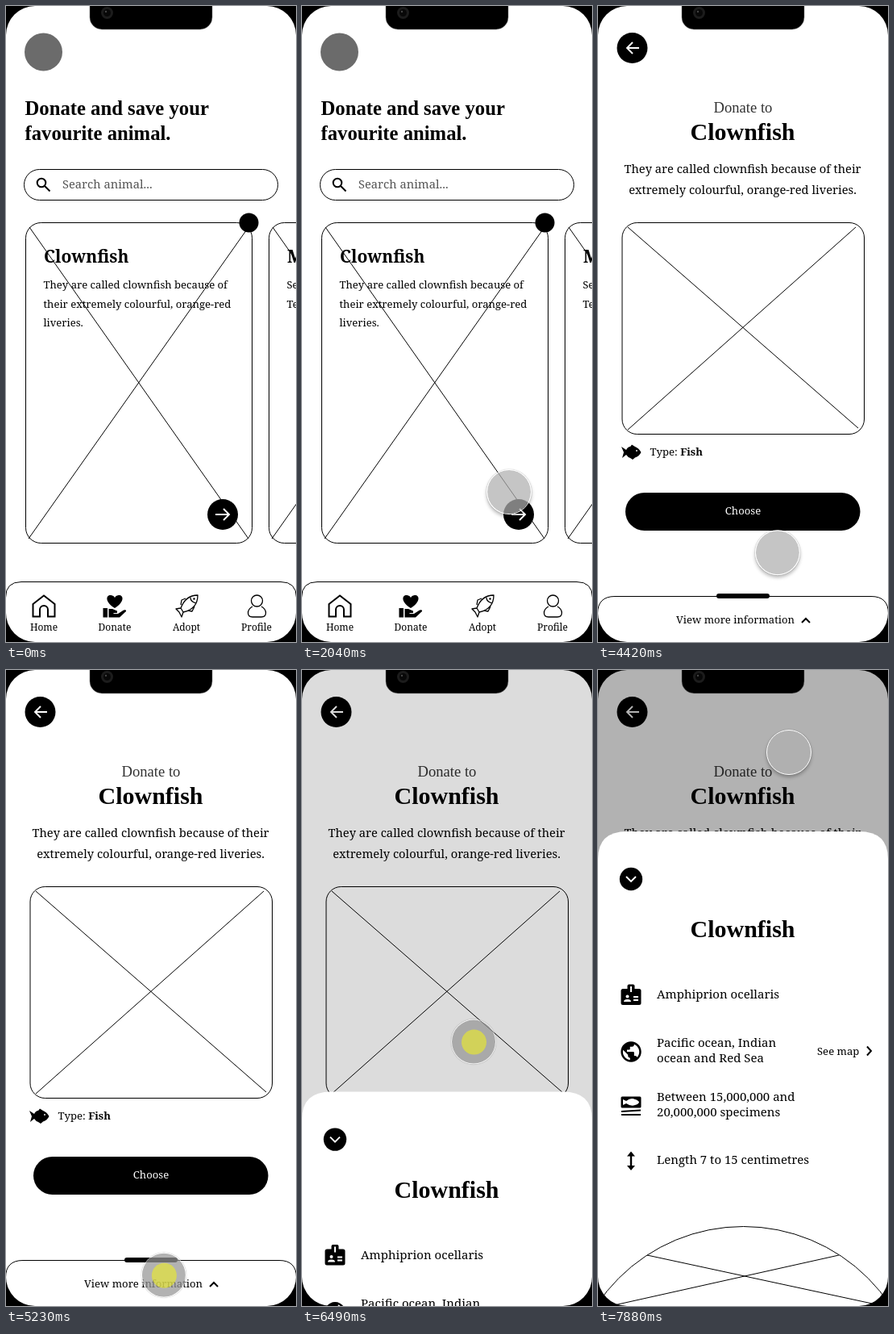
An HTML page for the animation above (8 s loop, 360 px wide and 788 px high).

```html
<!DOCTYPE html>
<html lang="en">
<head>
<meta charset="utf-8">
<style>
html, body { margin: 0; width: 100%; height: 100%; overflow: hidden; background: #fff; }
svg { position: absolute; left: 0; top: 0; width: 360px; height: 788px; }
text { font-family: "Noto Serif", serif; font-size: 13.1px; }
.line { fill: none; stroke: #000; }
.panel { fill: #fff; stroke: #000; }
.white { fill: none; stroke: #fff; stroke-width: 1.9; }
.bold { font-weight: bold; }
.mid { text-anchor: middle; }
.display { font-family: "Liberation Serif", serif; }
.heading { font-size: 24.7px; }
.name { font-size: 30px; }
.card-name { font-size: 21px; }
.lead { font-size: 14.7px; }
.nav text { font-size: 12px; }
.facts text { font-size: 15px; }
#cursor {
  position: absolute; left: -28px; top: -28px; width: 56px; height: 56px;
  box-sizing: border-box; border-radius: 50%; border: 1.5px solid #fff;
  background: rgba(175,175,175,.725) padding-box;
  box-shadow: 0 0 1px rgba(0,0,0,.5), 0 3px 4px rgba(0,0,0,.28);
}
#cursor.pressed {
  background-color: rgba(149,149,149,.725); border-color: rgba(255,255,255,.6);
  box-shadow: 0 0 1px rgba(0,0,0,.5);
}
#cursor.pressed::after {
  content: ""; position: absolute; inset: 11.5px; border-radius: 50%;
  background: rgba(236,236,40,.62);
}
</style>
</head>
<body>
<svg viewBox="0 0 360 788">
  <defs>
    <g id="card">
      <rect class="line" x="24.5" y="268.5" width="281" height="397" rx="19"/>
      <path class="line" d="M29 274L301 660M301 274L28 660"/>
      <circle cx="301.5" cy="268.5" r="12"/>
    </g>
  </defs>

  <g id="home">
    <circle cx="46.5" cy="57" r="23.5" fill="#6b6b6b"/>
    <text class="display heading bold" x="23.5" y="135">Donate and save your</text>
    <text class="display heading bold" x="23.5" y="166">favourite animal.</text>
    <rect class="line" x="22.5" y="202.5" width="315" height="38" rx="19"/>
    <g class="line" stroke-width="2"><circle cx="44" cy="219" r="5.3"/><path d="M48 223L54.5 229.5"/></g>
    <text class="lead" x="70" y="225.5" fill="#555">Search animal...</text>

    <use href="#card"/>
    <text class="bold card-name" x="47" y="318">Clownfish</text>
    <text x="46.5" y="350">They are called clownfish because of</text>
    <text x="46.5" y="374">their extremely colourful, orange-red</text>
    <text x="46.5" y="397">liveries.</text>
    <circle cx="269" cy="630" r="19"/>
    <path class="white" d="M260 630H277M270 623L277 630L270 637"/>

    <use href="#card" x="302"/>
    <text class="bold card-name" x="349" y="318">Manatee</text>
    <text x="348.5" y="350">Sea</text>
    <text x="348.5" y="374">Ten</text>

    <path class="panel" d="M-.5 790V733Q-.5 713.5 19 713.5H341Q360.5 713.5 360.5 733V790"/>
    <g class="nav mid">
      <path class="line" stroke-width="2" d="M33.5 741L47 730.5L60.5 741V756.5H52V748a5 5 0 0 0-10 0V756.5H33.5Z"/>
      <text x="47" y="774">Home</text>

      <path d="M135 746C121 737 125 729 130.5 730Q134 730.5 135 733Q136 730.5 139.5 730C145 729 149 737 135 746ZM120.5 746H126V757.5H120.5ZM127.5 747H132L138 749.5V752H133.5V753H139L146 748.5Q150 747.5 149 750L141 757.5H127.5Z"/>
      <text x="135" y="774">Donate</text>

      <g class="line" stroke-width="1.3" stroke-linejoin="round">
        <path d="M238 730Q223 730 217 746L211 747L215 751L218 757L220 751Q238 747 238 730ZM217 746L220 751M229 733Q229 738 236 740M223 734L218 736L217 742M234 744L231 750L226 749"/>
        <circle cx="233.5" cy="734.5" r=".6"/>
      </g>
      <text x="224" y="774">Adopt</text>

      <g class="line" stroke-width="1.3">
        <circle cx="311.5" cy="737" r="7"/>
        <path d="M306 744Q300.5 747 300.5 752Q300.5 757 306 757H317Q322.5 757 322.5 752Q322.5 747 317 744"/>
      </g>
      <text x="311" y="774">Profile</text>
    </g>
  </g>

  <g id="detail">
    <rect width="360" height="788" fill="#fff"/>
    <text class="mid display" x="180" y="132" fill="#333" style="font-size:18.6px">Donate to</text>
    <text class="mid display bold name" x="179.5" y="166">Clownfish</text>
    <text class="mid lead" x="179.5" y="206.5">They are called clownfish because of their</text>
    <text class="mid lead" x="179.5" y="232.5">extremely colourful, orange-red liveries.</text>
    <rect class="line" x="30" y="268.5" width="300.5" height="262" rx="18.5"/>
    <path class="line" d="M37 274L323 523M320 274L37 525"/>
    <path d="M29 546L35 550Q37 546 40 546L42 543.5L46 546Q51 548 53.5 553Q51 558 46 559.5L43 562L40 560Q37 559 35 556L30 560L32 553Z"/>
    <circle cx="48" cy="551" r=".9" fill="#fff"/>
    <text x="64.5" y="557">Type: <tspan class="bold">Fish</tspan></text>
    <rect x="34" y="603" width="291.5" height="47" rx="23.5"/>
    <text class="mid" x="180" y="630" fill="#fff">Choose</text>
    <path class="panel" d="M-.5 790V753Q-.5 731.5 21 731.5H339Q360.5 731.5 360.5 753V790"/>
    <rect x="147" y="728" width="66" height="6" rx="3"/>
    <text x="97" y="764.5">View more information</text>
    <path class="line" stroke-width="2" d="M253 764L258 759L263 764"/>
    <rect id="shade" width="360" height="788" opacity="0"/>
    <circle cx="42.5" cy="52" r="19"/>
    <path class="white" id="back" d="M51 52H36M43 45L36 52L43 59"/>
  </g>

  <g id="sheet">
    <path fill="#fff" d="M0 600V34Q0 0 36 0H324Q360 0 360 34V600Z"/>
    <circle cx="41" cy="59" r="14.2"/>
    <path class="white" d="M35 56L41 62L47 56"/>
    <text class="mid display bold name" x="179.5" y="131">Clownfish</text>

    <rect x="28.5" y="195" width="25" height="20" rx="2.5"/>
    <rect x="36.5" y="189.5" width="9" height="11" rx="2"/>
    <path stroke="#fff" stroke-width="2" d="M41 192V199M44 205H50M44 209H50"/>
    <g fill="#fff"><circle cx="36.5" cy="204.5" r="2"/><path d="M32 211Q32 208 36.5 208T41 211Z"/></g>

    <path transform="translate(25.8 257.8) scale(1.27)" d="M12 2C6.48 2 2 6.48 2 12s4.48 10 10 10 10-4.48 10-10S17.52 2 12 2zm-1 17.93c-3.95-.49-7-3.85-7-7.93 0-.62.08-1.21.21-1.79L9 15v1c0 1.1.9 2 2 2v1.93zm6.9-2.54c-.26-.81-1-1.39-1.9-1.39h-1v-3c0-.55-.45-1-1-1H8v-2h2c.55 0 1-.45 1-1V7h2c1.1 0 2-.9 2-2v-.41c2.93 1.19 5 4.06 5 7.41 0 2.08-.8 3.97-2.1 5.39z"/>

    <rect x="28.5" y="328.5" width="25" height="14" rx="1.5"/>
    <path fill="#fff" d="M31 332L35 334Q41 329 46 332Q50 333 51 335.5Q50 338 46 339Q41 341 35 337L31 339Z"/>
    <path class="line" stroke-width="2" d="M29 347L53 345.5M29 351H53"/>

    <path d="M41 396.5L46 402.5H42.2V414H46L41 420L36 414H39.8V402.5H36Z"/>

    <g class="facts">
      <text x="73" y="207">Amphiprion ocellaris</text>
      <text x="73" y="267">Pacific ocean, Indian</text>
      <text x="73" y="286">ocean and Red Sea</text>
      <text x="73" y="334">Between 15,000,000 and</text>
      <text x="73" y="353">20,000,000 specimens</text>
      <text x="73" y="412">Length 7 to 15 centimetres</text>
    </g>
    <text x="272" y="276.5">See map</text>
    <path class="line" stroke-width="2" d="M334 266.5L339 272L334 277.5"/>
    <circle class="line" cx="180.5" cy="708.5" r="219"/>
    <path class="line" d="M61 525L357 588.6M299 525L11 589"/>
  </g>

  <g id="phone">
    <path fill-rule="evenodd" d="M-2-2H362V790H-2ZM36 0H324A36 36 0 0 1 360 36V752A36 36 0 0 1 324 788H36A36 36 0 0 1 0 752V36A36 36 0 0 1 36 0Z"/>
    <path stroke="#777" stroke-width=".5" d="M104-1V14A15 15 0 0 0 119 29H241A15 15 0 0 0 256 14V-1Z"/>
    <circle cx="125.5" cy="8.5" r="7.5" fill="#1c1c1c"/>
    <circle cx="125.5" cy="8.5" r="4.5" fill="#080808"/>
    <circle cx="124" cy="7" r="1.2" fill="#444"/>
  </g>
</svg>
<div id="cursor"></div>

<script>
const LOOP = 8000, SHEET_OPEN = 200, SCREEN_H = 788;
const $ = id => document.getElementById(id);
const clamp01 = v => Math.min(1, Math.max(0, v));

// [time, x, y]
const cursorPath = [
  [1060, 274, 830], [1480, 224, 712], [1900, 232, 609], [2040, 257, 602], [2600, 269, 630],
  [4200, 269, 630], [4420, 223, 677], [4890, 196, 754], [5060, 196, 754], [5930, 195, 671],
  [6490, 213, 461], [7060, 225, 222], [7540, 237, 120], [7880, 237, 102]
];
// [time, top edge]
const sheetPath = [
  [5300, 790], [5860, 741], [5930, 722], [6490, 523], [7060, 276], [7420, SHEET_OPEN]
];

// Monotone cubic interpolation of one column of a keyframe list
function track(keys, t, col) {
  const last = keys.length - 1;
  if (t <= keys[0][0]) return keys[0][col];
  if (t >= keys[last][0]) return keys[last][col];
  const rate = i => (keys[i + 1][col] - keys[i][col]) / (keys[i + 1][0] - keys[i][0]);
  const slope = i => {
    if (i === 0 || i === last) return 0;
    const a = rate(i - 1), b = rate(i);
    return a * b > 0 ? 2 * a * b / (a + b) : 0;
  };
  const i = keys.findIndex(k => k[0] > t) - 1;
  const span = keys[i + 1][0] - keys[i][0], u = (t - keys[i][0]) / span;
  const ease = u * u * (3 - 2 * u);
  return keys[i][col] + (keys[i + 1][col] - keys[i][col]) * ease
    + span * u * (1 - u) * (slope(i) * (1 - u) - slope(i + 1) * u);
}

function draw() {
  const t = performance.now() % LOOP;
  const top = track(sheetPath, t, 1);
  const shade = 0.3 * clamp01((SCREEN_H - top) / (SCREEN_H - SHEET_OPEN));
  $('detail').setAttribute('opacity', clamp01((t - 3600) / 270));
  $('sheet').setAttribute('transform', `translate(0 ${top})`);
  $('shade').setAttribute('opacity', shade);
  $('back').setAttribute('opacity', 1 - shade);
  $('cursor').style.transform = `translate(${track(cursorPath, t, 1)}px, ${track(cursorPath, t, 2)}px)`;
  $('cursor').className = t >= 5090 && t < 7680 ? 'pressed' : '';
  requestAnimationFrame(draw);
}
draw();
</script>
</body>
</html>
```
